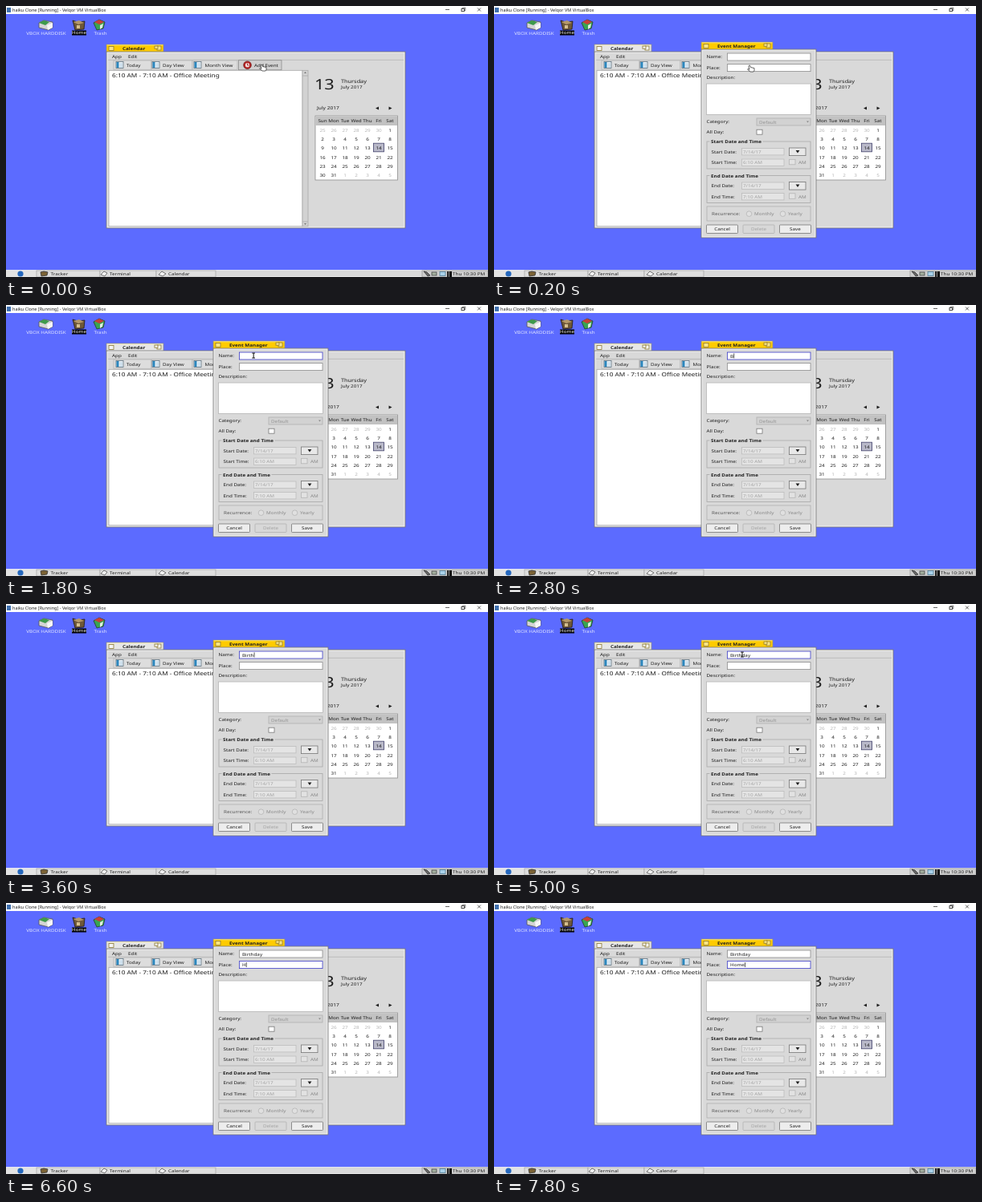
An HTML page for the animation above (8000 ms loop, 600 by 338 pixels).

```html
<!DOCTYPE html>
<html lang="en">
<head>
<meta charset="utf-8">
<title>Adding a calendar event</title>
<style>
  html, body { margin: 0; width: 100%; height: 100%; overflow: hidden; }
  svg { display: block; width: 100vw; height: 100vh; }
  text { font-family: "Noto Sans", sans-serif; text-rendering: geometricPrecision; white-space: pre; }
</style>
</head>
<body>
<svg id="stage" viewBox="0 0 600 338" preserveAspectRatio="none"></svg>
<script>
const STEP = 200, LOOP = 8000;
const ASPECT = 1.2; // the guest screen is shown wider than its native pixels
const FONT = 5.25;
const PANEL = '#d9d9d9', EDGE = '#8c8c8c', DIM = '#a3a3a3', INK = '#1c1c1c';
const YELLOW = '#ffcb00', FOCUS = '#3d3dc8';

const rect = (x, y, w, h, fill, stroke = 'none', extra = '') =>
  `<rect x="${x}" y="${y}" width="${w}" height="${h}" fill="${fill}" stroke="${stroke}" stroke-width=".8" ${extra}/>`;
const path = (d, fill, stroke = 'none', width = .8) =>
  `<path d="${d}" fill="${fill}" stroke="${stroke}" stroke-width="${width}"/>`;
const circle = (x, y, r, fill, stroke = 'none') =>
  `<circle cx="${x}" cy="${y}" r="${r}" fill="${fill}" stroke="${stroke}" stroke-width=".8"/>`;
const text = (x, y, label, { size = FONT, fill = INK, weight = 400, anchor = 'start', id = '' } = {}) =>
  `<text id="${id}" transform="translate(${x} ${y}) scale(${ASPECT} 1)" font-size="${size}" fill="${fill}" font-weight="${weight}" text-anchor="${anchor}">${label}</text>`;
const centered = (x, y, label, style) => text(x, y, label, { anchor: 'middle', ...style });
const down = (x, y) => path(`M${x - 2.4} ${y - 1.5}h4.8l-2.4 3.4z`, INK);

function tab(x, y, w, title, titleX, fill, boxFill) {
  return rect(x, y, w, 10, fill, EDGE) +
    path(`M${x + .6} ${y + .8}h${w - 1.2}`, 'none', '#fff3a8', .7) +
    rect(x + 3, y + 2.4, 6, 5, boxFill, '#8e7a30') +
    rect(x + w - 8, y + 2, 5, 5, boxFill, '#8e7a30') +
    rect(x + w - 11, y + 2, 4, 3.2, boxFill, '#8e7a30') +
    text(titleX, y + 6.8, title, { weight: 700 });
}

function frame(x, y, w, h) {
  return rect(x, y, w, h, PANEL, '#777') +
    rect(x + 1.3, y + 1.3, w - 2.6, h - 2.6, 'none', '#efefef');
}

function hostBar() {
  return rect(0, 0, 600, 10, '#fff') + rect(1, 2, 5, 6, '#3f6fae') +
    `<text x="8" y="7" font-size="5.5" fill="#222">haiku Clone [Running] - Velqor VM VirtualBox</text>` +
    path('M547 4.5h5M587 2.5l4 4m0-4l-4 4', 'none', '#222', .7) +
    rect(567, 3.4, 3.4, 3.2, '#fff', '#222') + path('M568.4 3.2v-1h3.4v3.3h-1', 'none', '#222', .6);
}

function desktopIcons() {
  const label = { fill: '#e4e8ff' };
  return path('M41 21l6-3 11 2v7l-5 3-12-3z', '#d5d5d5', '#555') +
    path('M41 21l6-3 7 2-5 4z', '#3e9a4c') + path('M51 24l7-3v6l-6 3z', '#f7f7f7') +
    centered(50, 35.5, 'VBOX HARDDISK', label) +
    path('M83 18l6 2 9-1-1 10-11 1z', '#6e5838', '#21180e') +
    path('M84 20l6 3 7-2-6-3z', '#b49869') + rect(88, 24, 4, 4, '#d5bf8e') +
    rect(82, 30.5, 18, 6, '#000') + centered(91, 35.4, 'Home', { fill: '#fff' }) +
    path('M109 21l7-4 7 3-2 8-8 2z', '#38a552', '#283a2a') +
    path('M110 20l6-3 6 3-6 3z', '#c84036') + path('M117 24l4-2-1 5-3 2z', '#e0eee0') +
    centered(117.5, 35.5, 'Trash', label);
}

function deskbar() {
  const task = (x, w, icon, label, labelX) => rect(x, 330, w, 8, '#dedede', '#aaa') + icon + text(labelX, 336, label);
  return rect(0, 329.6, 600, 8.4, PANEL, '#f5f5f5') +
    rect(0, 330, 38, 8, '#e3e3e3') + circle(18, 334, 3.6, '#2467bd') +
    task(38, 79, path('M43 332l4-1 5 1-1 4-7 1z', '#7b6235', '#333'), 'Tracker', 55.5) +
    task(117, 70, path('M118 335l4-4 4 2-3 4z', '#f2f2f2', '#555'), 'Terminal', 129) +
    task(187, 74, path('M190 335l4-4 5 3-4 3z', '#f2f2f2', '#555'), 'Calendar', 202) +
    rect(518, 330, 82, 8, '#cfcfcf', '#999') +
    path('M520 331l4 1 4 4-3 1z', '#696969', '#333') + rect(530, 332, 6, 4, '#a4b1a0', '#444') +
    rect(540, 331.5, 7, 5, '#a9d1e9', '#507c95') + rect(549, 331, 2.4, 7, '#222') + rect(552, 331, 3, 7, '#111') +
    text(556, 336.3, 'Thu 10:30 PM');
}

function monthGrid() {
  const column = i => 394 + i * 14;
  let out = rect(385, 137, 102.5, 80, '#fff', EDGE) + rect(385.5, 137.5, 101.5, 11.5, '#c2c2c2');
  ['Sun', 'Mon', 'Tue', 'Wed', 'Thu', 'Fri', 'Sat'].forEach((day, i) => out += centered(column(i), 145.3, day));
  out += rect(457.5, 171.2, 13, 10.6, '#b9b9c9', '#41416b');
  for (let i = 0; i < 42; i++) {
    const day = i - 5, outside = day < 1 || day > 31;
    const shown = day < 1 ? day + 30 : day > 31 ? day - 31 : day;
    out += centered(column(i % 7), 157 + Math.floor(i / 7) * 11.2, shown, { fill: outside ? '#b4b4b4' : INK });
  }
  return out;
}

function calendarWindow() {
  const dayIcon = x => rect(x, 69.5, 9, 8, '#f3f8fc', '#596d7c') + rect(x + .5, 70, 3, 7, '#2b86bd') +
    path(`M${x + 4.5} 72h3.5m-3.5 2h3.5m-3.5 2h3.5`, 'none', '#72a6c8', .6);
  const button = (x, w, icon, label, labelX) => rect(x, 68, w, 11.3, '#dddddd', '#b8b8b8') + icon + text(labelX, 75.7, label);
  return `<g id="activeTab">${tab(125, 48, 71, 'Calendar', 145, YELLOW, '#ffe682')}</g>` +
    `<g id="idleTab">${tab(125, 48, 71, 'Calendar', 145, '#e6e6e6', '#f4f4f4')}</g>` +
    frame(125, 57, 372, 220) +
    path('M127 67.3h368', 'none', '#b5b5b5') +
    text(132, 64.6, 'App') + text(152, 64.6, 'Edit') +
    button(134, 47, dayIcon(137), 'Today', 150) +
    button(181, 51, dayIcon(182), 'Day View', 195) +
    button(232, 56, dayIcon(234), 'Month View', 247.5) +
    rect(289.5, 67.7, 53.5, 12, '#d0d0d0', '#8d8d8d') + circle(300.5, 73.7, 4.8, '#b82525', '#6b1717') +
    circle(300.5, 73.7, 2.6, '#f3dddd') + path('M300.5 71.5v2.4h2', 'none', '#8b1919') + text(309, 75.9, 'Add Event') +
    rect(128, 80.3, 241, 194.5, '#fff', '#aaa') +
    rect(369, 80.3, 7, 194.5, '#d2d2d2', '#aaa') +
    path('M371 84l1.5-2 1.5 2zM371 271l1.5 2 1.5-2z', '#777') +
    path('M369 87h7m-7 182h7', 'none', '#aaa') +
    text(132, 88.6, '6:10 AM - 7:10 AM - Office Meeting', { size: 6.9 }) +
    text(384, 104, '13', { size: 18 }) + text(417, 96.2, 'Thursday', { size: 6.1 }) + text(417, 103.2, 'July 2017') +
    text(387, 129.3, 'July 2017', { size: 5.5 }) +
    path('M464 125.5v4l-4-2zM476.5 125.5v4l4-2z', INK) + monthGrid();
}

function dateGroup(y, name, date, time) {
  const field = top => rect(308.5, top, 52.5, 8.4, '#e4e4e4', '#bdbdbd');
  return rect(265, y, 129, 34, 'none', '#a9a9a9') +
    rect(268.5, y - 3, name === 'Start' ? 66 : 62, 6, PANEL) + text(270, y + 2, `${name} Date and Time`, { weight: 700 }) +
    text(270.5, y + 14.5, `${name} Date:`) + field(y + 8.5) + text(310, y + 14.8, date, { fill: DIM }) +
    rect(367.5, y + 8, 20.5, 9.6, '#e8e8e8', '#777') + down(378, y + 12.6) +
    text(270.5, y + 28, `${name} Time:`) + field(y + 22) + text(310, y + 28.3, time, { fill: DIM }) +
    rect(367.5, y + 22.3, 7.5, 6.5, '#e2e2e2', '#b5b5b5') + text(379, y + 28, 'AM', { fill: '#888' });
}

function eventDialog() {
  const button = (x, label, enabled = true) =>
    rect(x, 273, 39, 10.5, enabled ? '#ededed' : '#d8d8d8', enabled ? '#777' : '#b2b2b2', 'rx=".8"') +
    centered(x + 19.5, 280.2, label, { fill: enabled ? INK : DIM });
  return tab(258, 45, 89, 'Event Manager', 278, YELLOW, '#ffe682') + frame(258, 54, 143, 235) +
    text(264.5, 65.2, 'Name:') + rect(290.5, 59, 103.5, 9, '#fff', EDGE, 'id="nameField"') +
    text(264.5, 78.8, 'Place:') + rect(290.5, 72.6, 103.5, 9, '#fff', EDGE, 'id="placeField"') +
    text(294, 65.6, '', { id: 'nameText' }) + text(294, 79.2, '', { id: 'placeText' }) +
    text(264.5, 91.3, 'Description:') + rect(264.5, 97, 130, 38.5, '#fff', '#b5b5b5') +
    text(264.5, 146.4, 'Category:') + rect(327, 140, 67, 9, '#d2d2d2', '#b0b0b0') +
    text(330, 146.5, 'Default', { fill: '#929292' }) + path('M389 143.5h3l-1.5 2z', '#888') +
    text(264.5, 159.2, 'All Day:') + rect(327, 154.2, 7, 6, '#fff', '#777') +
    dateGroup(169, 'Start', '7/14/17', '6:10 AM') + dateGroup(211.5, 'End', '7/14/17', '7:10 AM') +
    rect(265, 250, 129, 18, 'none', '#b0b0b0') + text(271, 261, 'Recurrence:', { fill: '#555' }) +
    circle(317.5, 259.2, 3.3, '#e0e0e0', '#b5b5b5') + text(324, 261, 'Monthly', { fill: '#888' }) +
    circle(359.5, 259.2, 3.3, '#e0e0e0', '#b5b5b5') + text(366, 261, 'Yearly', { fill: '#888' }) +
    button(264.5, 'Cancel') + button(310, 'Delete', false) + button(355.5, 'Save') +
    path('M0 0v6', 'none', '#111', .7).replace('<path', '<path id="caret"');
}

const byId = id => document.getElementById(id);
byId('stage').innerHTML = rect(0, 0, 600, 338, '#5c6bff') + hostBar() + desktopIcons() + deskbar() +
  calendarWindow() + `<g id="dialog">${eventDialog()}</g>` +
  `<g id="hand">${path('M-3-3q0-1 1.5-1l1 2.5 4.5 1v3l-1 1.5h-4l-3.5-3 1-.7 1.5 1z', '#fff', '#222', .7)}</g>` +
  `<g id="beam">${path('M-1.8-3h3.6M0-3v6M-1.8 3h3.6', 'none', '#111', 1)}</g>`;

const fields = {
  name: { value: 'Birthday', keys: [2800, 3000, 3200, 3400, 3600, 4000, 4200, 4600], y: 60.4 },
  place: { value: 'Home', keys: [6600, 7000, 7400, 7600], y: 74 }
};
// Pointer path as [time, x, y]
const moves = [[0, 320, 77], [200, 320, 78], [400, 320, 78], [1200, 308, 63], [5000, 309, 63], [5600, 309, 76], [LOOP, 309, 76]];

function pointerAt(t) {
  const i = moves.findIndex(move => move[0] > t);
  const [t0, x0, y0] = moves[i - 1], [t1, x1, y1] = moves[i];
  const k = (t - t0) / (t1 - t0);
  return `translate(${x0 + (x1 - x0) * k} ${y0 + (y1 - y0) * k})`;
}

const show = (id, visible) => byId(id).setAttribute('visibility', visible ? 'visible' : 'hidden');

function render(t) {
  const open = t >= 200;
  byId('dialog').style.display = open ? '' : 'none';
  show('activeTab', !open);
  show('idleTab', open);

  const focus = t >= 5600 ? 'place' : t >= 1400 ? 'name' : '';
  show('caret', false);
  for (const [id, { value, keys, y }] of Object.entries(fields)) {
    const count = keys.filter(time => time <= t).length;
    const label = byId(id + 'Text');
    label.textContent = value.slice(0, count);
    byId(id + 'Field').setAttribute('stroke', id === focus ? FOCUS : EDGE);
    if (id === focus && count && t - keys[count - 1] < 400) {
      const x = 294.6 + label.getComputedTextLength() * ASPECT;
      byId('caret').setAttribute('transform', `translate(${x} ${y})`);
      show('caret', true);
    }
  }

  const typing = (t >= 2800 && t < 5000) || t >= 6600;
  for (const id of ['hand', 'beam']) byId(id).setAttribute('transform', pointerAt(t));
  show('hand', t < 400);
  show('beam', t >= 400 && !typing);
}

function tick() {
  const t = performance.now() % LOOP;
  render(Math.floor(t / STEP) * STEP);
  requestAnimationFrame(tick);
}
tick();
</script>
</body>
</html>
```
